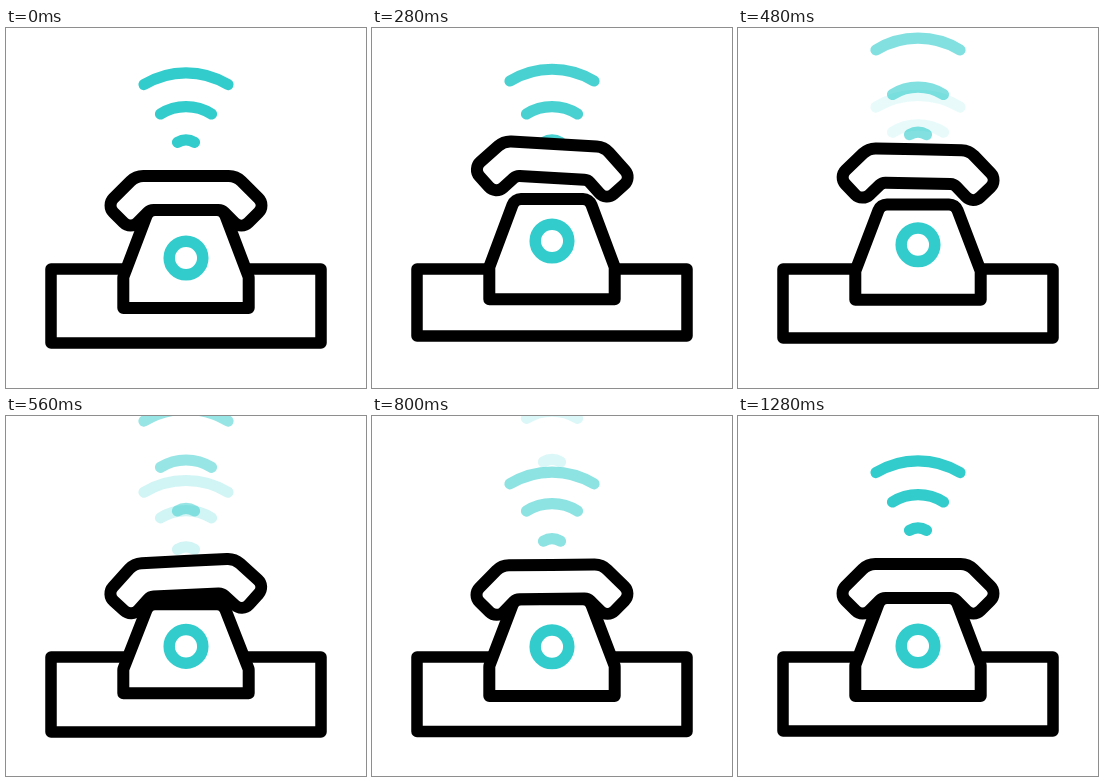
Recreate the animation shown at these times as an HTML page with a canvas. Size 360 px wide and 360 px high, loop 1480 ms.

```html
<!DOCTYPE html>
<html lang="en">
<head>
<meta charset="utf-8">
<title>Ringing telephone</title>
<style>
html, body { margin: 0; width: 100%; height: 100%; overflow: hidden; background: #fff; }
canvas { display: block; width: 360px; height: 360px; }
</style>
</head>
<body>
<canvas id="stage" width="360" height="360"></canvas>
<script>
const ctx = document.getElementById('stage').getContext('2d');
const LOOP = 1480, STEP = 40, CX = 180, TEAL = '#33cccc';

const clamp = v => Math.max(0, Math.min(1, v));
const smooth = v => { v = clamp(v); return v * v * (3 - 2 * v); };

// Jump: rest -> peak (360 ms) -> squash (640 ms) -> rest (840 ms)
function hop(t, peak, low) {
  if (t < 360) return peak * smooth((t - 160) / 200);
  if (t < 640) return peak + (low - peak) * smooth((t - 360) / 280);
  return low * (1 - smooth((t - 640) / 200));
}

// Closed polygon with rounded corners; each point is [x, y, radius]
function shape(pts) {
  const last = pts[pts.length - 1];
  ctx.beginPath();
  ctx.moveTo((last[0] + pts[0][0]) / 2, (last[1] + pts[0][1]) / 2);
  pts.forEach(([x, y, r], i) => {
    const next = pts[(i + 1) % pts.length];
    ctx.arcTo(x, y, next[0], next[1], r);
  });
  ctx.closePath();
  ctx.fill();
  ctx.stroke();
}

// Completes the left half of a shape from its right half
const mirror = half =>
  half.concat(half.slice().reverse().map(([x, y, r]) => [2 * CX - x, y, r]));

const waves = [
  { top: 44.8, r: 81, half: 42, wait: 0, rise: 25.3 },
  { top: 78.6, r: 48, half: 25.5, wait: 80, rise: 20.5 },
  { top: 112, r: 17, half: 8.5, wait: 160, rise: 24.5 }
];

function drawWave(w, dy, alpha) {
  if (alpha <= 0) return;
  const a = Math.asin(w.half / w.r);
  ctx.globalAlpha = alpha;
  ctx.beginPath();
  ctx.arc(CX, w.top + w.r + dy, w.r, -Math.PI / 2 - a, -Math.PI / 2 + a);
  ctx.stroke();
  ctx.globalAlpha = 1;
}

function drawWaves(t) {
  const gone = clamp((t - 200) / 720);
  const come = clamp((t - 400) / 720);
  ctx.strokeStyle = TEAL;
  ctx.lineWidth = 11.2;
  for (const w of waves) {
    drawWave(w, w.rise * (1 - come), come);
    drawWave(w, -103 * smooth((t - 200 - w.wait) / 720), 1 - gone);
  }
}

function drawPhone(t) {
  ctx.strokeStyle = '#000';
  ctx.fillStyle = '#fff';
  ctx.lineWidth = 11.5;

  const floor = 315 + hop(t, -10.8, 3.8);
  shape(mirror([[315, 241, 0], [315, floor, 0]]));

  const top = 182 + hop(t, -17, 12);
  const shoulder = 249 + hop(t, -15.5, 9);
  const bottom = 280 + hop(t, -13.5, 0);
  ctx.lineWidth = 12;
  shape(mirror([[217.3, top, 9], [242.7, shoulder, 4], [242.7, bottom, 0]]));

  ctx.strokeStyle = TEAL;
  ctx.lineWidth = 11.5;
  ctx.beginPath();
  ctx.arc(CX, 230 + hop(t, -26.3, 7), 16.8, 0, 2 * Math.PI);
  ctx.stroke();

  ctx.strokeStyle = '#000';
  ctx.lineWidth = 12;
  ctx.save();
  ctx.translate(CX, 182 + hop(t, -49.5, 8.5));
  ctx.rotate(hop(t, 5.1, -4.8) * Math.PI / 180);
  ctx.translate(-CX, -182);
  shape(mirror([[230.2, 148, 18], [259.6, 177.4, 10], [235.4, 201.6, 10], [215.8, 182, 8]]));
  ctx.restore();
}

function draw(now) {
  const t = Math.floor((now % LOOP) / STEP) * STEP;
  ctx.fillStyle = '#fff';
  ctx.fillRect(0, 0, 360, 360);
  ctx.lineCap = ctx.lineJoin = 'round';
  drawWaves(t);
  drawPhone(t);
}

const start = performance.now();
function tick() {
  draw(performance.now() - start);
  requestAnimationFrame(tick);
}
tick();
</script>
</body>
</html>
```
